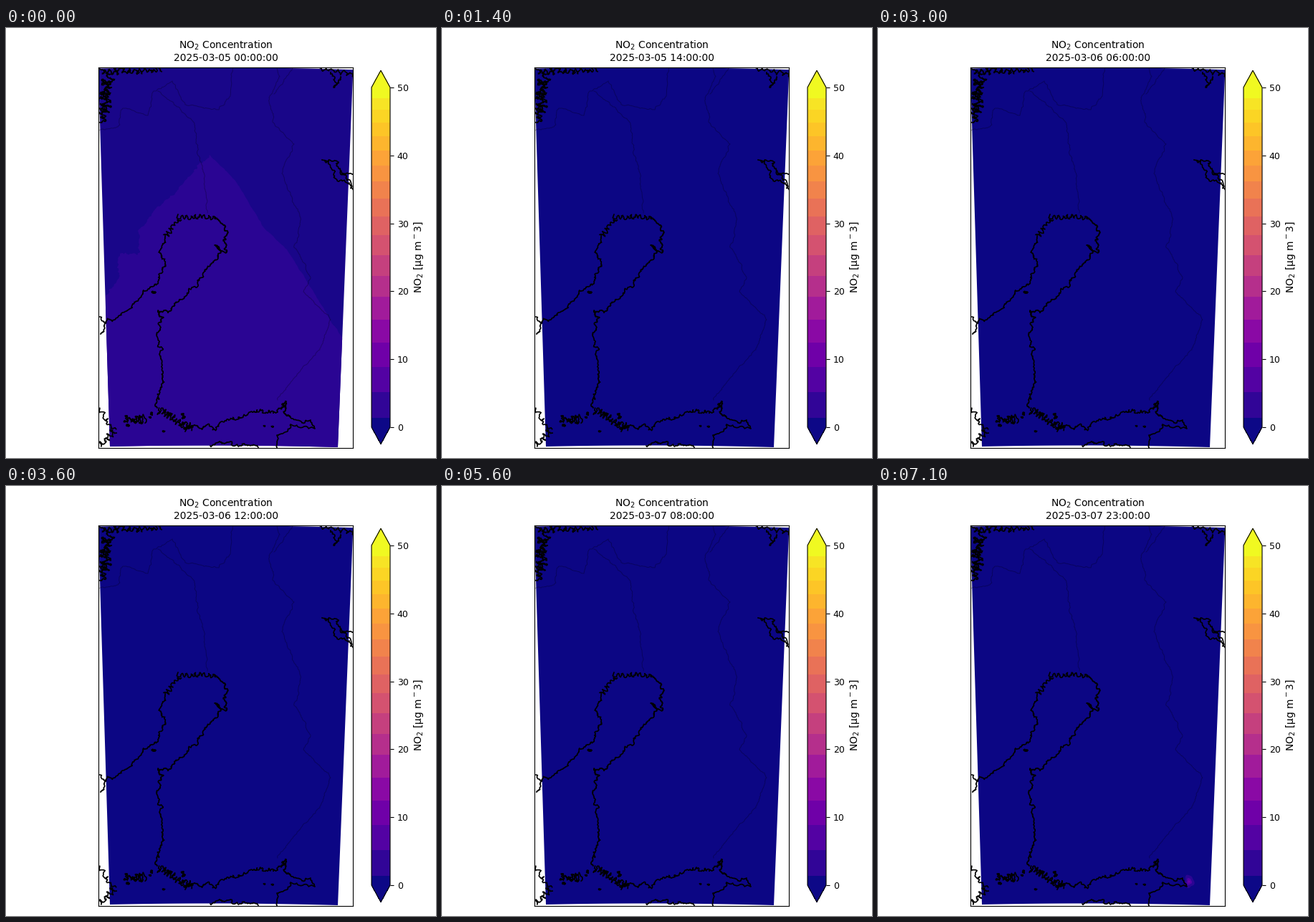
Write a matplotlib script that moves like this. It is 600 px wide and 600 px high and loops after 7200 ms.

```python
import matplotlib.pyplot as plt
import numpy as np
from matplotlib.animation import FuncAnimation
from matplotlib.cm import ScalarMappable
from matplotlib.colors import from_levels_and_colors, to_rgb
from matplotlib.patches import Polygon

SIZE, DPI = 600, 100
HOURS = 72
LEFT, RIGHT, TOP, BOTTOM = 129.2, 484.2, 54.6, 585.6
PLASMA = plt.get_cmap("plasma")
AIR = np.array(to_rgb("#0c0684"))
EARLY_AIR = np.array(to_rgb("#190689"))
LOW, MID, HIGH = "#2a0593", "#5002a2", "#6e00a8"

rng = np.random.default_rng(5)
fig = plt.figure(figsize=(SIZE / DPI, SIZE / DPI), dpi=DPI, facecolor="white")


def add_axes(x0, y0, x1, y1):
    return fig.add_axes([x0 / SIZE, 1 - y1 / SIZE,
                         (x1 - x0) / SIZE, (y1 - y0) / SIZE])


# Map axes use pixel coordinates with y pointing down
ax = add_axes(LEFT, TOP, RIGHT, BOTTOM)
ax.set(xlim=(LEFT, RIGHT), ylim=(BOTTOM, TOP), xticks=[], yticks=[])
title = ax.set_title("", fontsize=10)


# Colour scale: bands get narrower towards the top
widths = np.r_[13, np.linspace(36, 15, 18)]
levels = np.r_[0, np.cumsum(widths)] * 50 / widths.sum()
mids = (levels[:-1] + levels[1:]) / 100
mids[0], mids[-1] = 0, 1
cmap, norm = from_levels_and_colors(
    levels, PLASMA(np.r_[0, mids, 1.0]), extend="both")
cax = add_axes(510, 59.2, 536, 580.6)
ticks = range(0, 51, 10)
bar = fig.colorbar(ScalarMappable(norm, cmap), cax=cax,
                   spacing="proportional", ticks=ticks)
bar.minorticks_off()
bar.ax.tick_params(labelsize=9)
bar.ax.set_yticklabels([str(v) for v in ticks])
bar.set_label("NO$_2$ [µg m$^-3$]", fontsize=10)


# Model domain: slightly curved top and bottom edges
u = np.linspace(0, 1, 40)
top_edge = np.c_[128.7 + 355.6 * u, 56.6 + 1.6 * u - 9 * u * (1 - u)]
bottom_edge = np.c_[463 - 318 * u, 585 - u - 8 * u * (1 - u)]
domain = Polygon(np.vstack([top_edge, bottom_edge]), fc=AIR, lw=0, zorder=1)
ax.add_patch(domain)


def add_fill(color, z):
    patch = Polygon(np.zeros((3, 2)), fc=color, lw=0, zorder=z, visible=False)
    ax.add_patch(patch)
    patch.set_clip_path(domain)
    return patch


def fractal(points, rough, reach=9):
    """Midpoint displacement, with the largest bumps limited by reach."""
    pts = np.array(points, float)
    while True:
        step = np.diff(pts, axis=0)
        length = np.hypot(*step.T)[:, None]
        if length.max() < 3:
            return pts
        side = step[:, ::-1] * (1, -1) / np.maximum(1, length / reach)
        middle = pts[:-1] + step / 2 + side * rng.normal(0, rough, length.shape)
        grown = np.empty((2 * len(pts) - 1, 2))
        grown[::2], grown[1::2] = pts, middle
        pts = grown


def comb(start, end, teeth, depth):
    """Zigzag of random spurs along a straight line."""
    start, end = np.array(start, float), np.array(end, float)
    t = np.linspace(0, 1, teeth)[:, None]
    along = (end - start) / np.hypot(*(end - start))
    sign = (-1) ** np.arange(teeth)[:, None]
    spur = sign * rng.uniform(0.2, 1, (teeth, 1)) * depth
    return start + (end - start) * t + spur * along[::-1] * (1, -1)


def coast(points, rough=0.22):
    ax.plot(*fractal(points, rough).T, color="black", lw=1.2, zorder=5)


def border(points):
    ax.plot(*fractal(points, 0.1).T, color="black", lw=0.7, alpha=0.28,
            zorder=4)


def islets(x, y, dx, dy, count, size=1.4):
    a = np.linspace(0, 2 * np.pi, 8)
    for _ in range(count):
        r = size * rng.uniform(0.4, 1.3, 8)
        r[-1] = r[0]
        cx, cy = x + rng.uniform(-dx, dx), y + rng.uniform(-dy, dy)
        ax.plot(cx + 1.3 * r * np.cos(a), cy + r * np.sin(a), color="black",
                lw=1.2, zorder=5)


# Gulf: western shore, ragged head, eastern shore
coast([(132, 427), (139, 412), (163, 397), (190, 372), (207, 358), (223, 332),
       (213, 313), (222, 288)])
coast([(131, 403), (139, 412)])
coast(comb((222, 290), (242, 266), 12, 5))
coast(comb((240, 264), (292, 264), 18, 4))
coast([(292, 264), (305, 275), (307, 295), (308, 313), (291, 303), (300, 311),
       (283, 333), (249, 375), (226, 397)])
coast([(226, 397), (212, 394), (220, 404), (210, 428), (219, 482), (215, 505),
       (211, 530)])

# Southern shore and the inlet at its end
coast(comb((212, 533), (260, 560), 24, 7))
coast([(250, 563), (285, 556), (337, 540), (384, 532), (391, 521), (389, 538),
       (397, 543)], 0.28)
coast([(397, 543), (413, 551), (425, 547), (431, 559), (397, 553), (386, 566),
       (378, 568), (378, 586)], 0.15)
coast([(285, 583), (313, 577), (352, 585)], 0.25)

# Corners of the map
coast(comb((131, 62), (217, 59), 26, 6))
coast(comb((143, 64), (135, 132), 22, 10))
coast(comb((142, 75), (136, 120), 14, 9))
coast(comb((130, 531), (150, 562), 9, 5))
coast(comb((151, 562), (131, 582), 9, 5))
coast(comb((438, 57), (484, 64), 12, 4))
coast([(453, 62), (457, 83), (467, 68)], 0.28)
coast([(441, 184), (464, 187), (466, 198), (485, 205)])
coast([(446, 185), (457, 205), (477, 217), (485, 226)], 0.3)
coast(comb((466, 200), (484, 220), 6, 3))

# Islands
coast(comb((167, 547), (194, 546), 12, 7))
islets(180, 549, 14, 8, 9)
islets(201, 539, 3, 6, 3, 1)
islets(236, 550, 20, 14, 9)
islets(206, 369, 1, 3, 2)
islets(362, 556, 11, 1, 2, 1)

# National borders
border([(130, 143), (156, 138), (163, 112), (198, 122), (206, 88), (232, 74),
        (250, 107), (270, 110), (297, 114), (313, 95), (317, 55)])
border([(212, 88), (263, 133), (268, 178), (277, 208), (281, 258)])
border([(377, 55), (382, 68), (367, 97), (372, 131), (402, 162), (385, 203),
        (411, 265), (402, 303), (425, 348), (415, 368), (453, 407), (440, 443),
        (379, 519)])
border([(400, 55), (374, 92)])

# Early plume that withdraws to the south
plume = add_fill(LOW, 2)
BASE = (305, 600)
west_side = fractal([(139, 374), (158, 349), (160, 314), (184, 316),
                     (187, 280), (227, 238), (266, 192), (284, 177)], 0.15)
east_side = fractal([(284, 177), (318, 211), (360, 279), (392, 309),
                     (425, 362), (470, 434)], 0.04)
plume_shape = np.vstack([west_side, east_side, [(470, 600), (139, 600)]])


def plume_at(hour):
    s = max(0.0, 1 - hour / 8)
    return BASE + (plume_shape - BASE) * (s ** 0.3, s)


# Local hot spots, drawn as nested contours of a bell-shaped peak
THRESHOLDS = (1.4, 4.9, 7.4)
east, south = ([add_fill(c, 3) for c in (LOW, MID, HIGH)] for _ in range(2))
angle = np.linspace(0, 2 * np.pi, 24, endpoint=False)
wobble = 1 + 0.12 * np.sin(3 * angle + 1) + 0.08 * np.sin(5 * angle)


def set_spot(patches, x, y, peak, width, height):
    for patch, level in zip(patches, THRESHOLDS):
        patch.set_visible(peak > level)
        if peak > level:
            r = np.sqrt(2 * np.log(peak / level)) * wobble
            patch.set_xy(np.c_[x + width * r * np.cos(angle),
                               y + height * r * np.sin(angle)])


def update(hour):
    title.set_text("NO$_2$ Concentration\n"
                   f"2025-03-{5 + hour // 24:02d} {hour % 24:02d}:00:00")
    early = max(0.0, 1 - hour / 10)
    domain.set_facecolor(AIR + (EARLY_AIR - AIR) * early)
    plume.set_visible(hour < 8)
    plume.set_xy(plume_at(hour))
    late = np.clip((hour - 64) / 7, 0, 1)
    set_spot(east, 436 - 2 * late, 556 - 4 * late,
             np.interp(hour, [58, 64, 71], [1.2, 3.0, 8.0]), 3.6, 4.8)
    set_spot(south, 242, 578, 2 - abs(hour - 64) / 4, 4, 4)
    return [title, domain, plume, *east, *south]


anim = FuncAnimation(fig, update, frames=HOURS, interval=100, repeat=True,
                     repeat_delay=0, blit=False)
plt.show()
```
